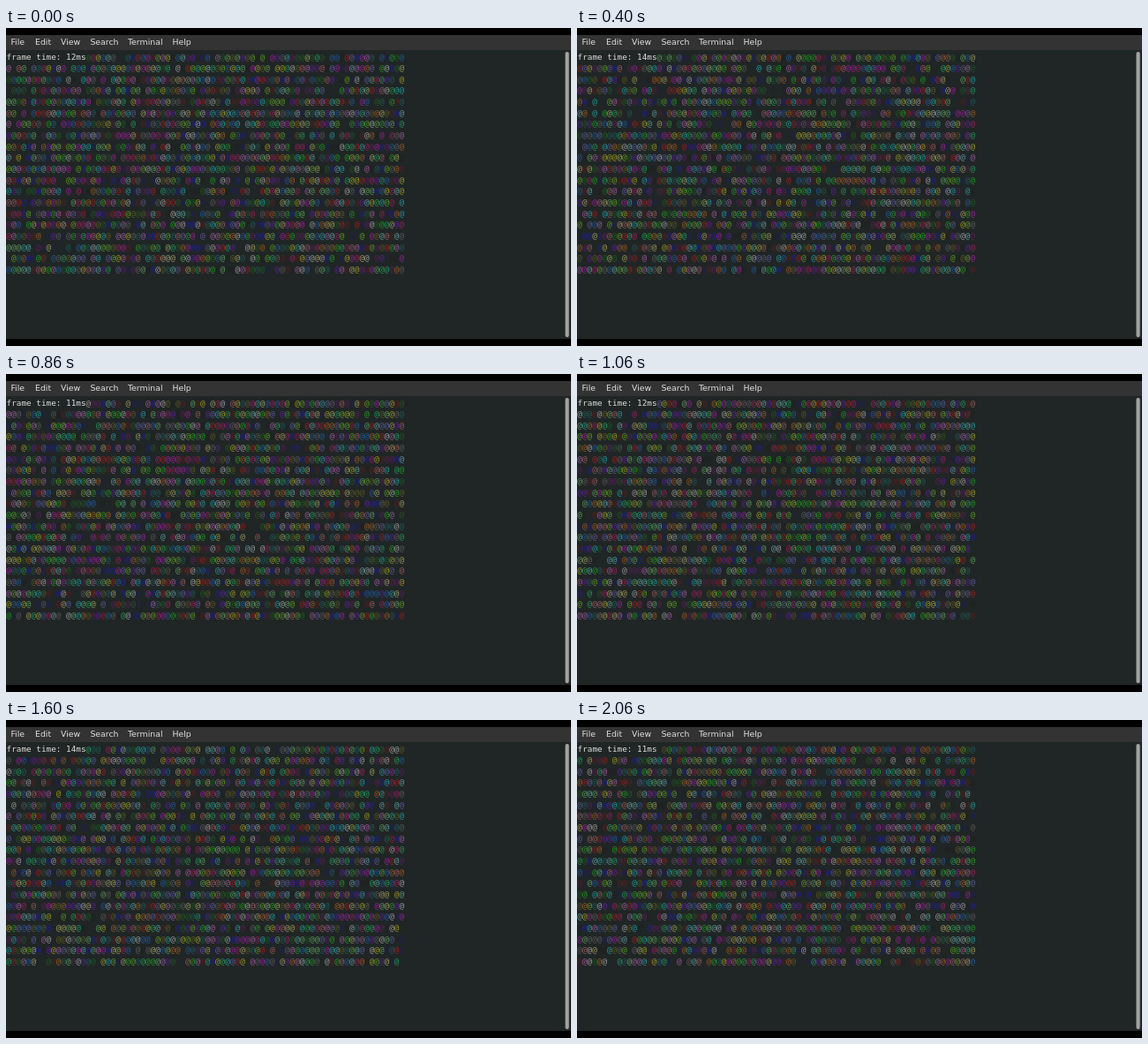
An HTML page with a canvas that plays this animation: 640x360 px, repeating every 2130 ms.

```html
<!DOCTYPE html>
<html lang="en">
<head>
<meta charset="utf-8">
<title>Terminal</title>
<style>
html, body { margin: 0; width: 100%; height: 100%; overflow: hidden; background: #000; }
canvas { display: block; }
</style>
</head>
<body>
<canvas id="stage" width="640" height="360"></canvas>
<script>
const ctx = document.getElementById('stage').getContext('2d');
const LOOP = 2130, STEPS = 32;
const COLS = 80, ROWS = 20, CELL_W = 5.635, ROW_H = 12.66, BASE_Y = 35.5;
const MONO = '9.36px "DejaVu Sans Mono", monospace';
const SANS = '9.36px "DejaVu Sans", sans-serif';
const MENU = [['File', 5.4], ['Edit', 33], ['View', 62], ['Search', 95.4], ['Terminal', 138], ['Help', 188.4]];
const LEVELS = [32, 90, 155];
// Milliseconds reported at each step
const TIMES = [12, 12, 13, 11, 12, 13, 14, 12, 11, 12, 11, 13, 12, 11, 12, 13,
               12, 11, 12, 14, 11, 12, 13, 11, 14, 12, 11, 12, 13, 12, 11, 11];

function random(seed) {
  return () => {
    seed = (seed + 0x6D2B79F5) | 0;
    let v = Math.imul(seed ^ (seed >>> 15), 1 | seed);
    v ^= v + Math.imul(v ^ (v >>> 7), 61 | v);
    return ((v ^ (v >>> 14)) >>> 0) / 4294967296;
  };
}

function rect(color, x, y, w, h) {
  ctx.fillStyle = color;
  ctx.fillRect(x, y, w, h);
}

function text(str, x, y, font, color) {
  ctx.font = font;
  ctx.fillStyle = color;
  ctx.fillText(str, x, y);
}

function drawWindow() {
  rect('#000', 0, 0, 640, 360);
  rect('#333', 0, 8, 640, 17);
  rect('#202525', 0, 25, 640, 327);
  ctx.fillStyle = '#a3a39f';
  ctx.beginPath();
  ctx.roundRect(633.5, 27, 4.2, 323, 2);
  ctx.fill();
  for (const [label, x] of MENU) text(label, x, 19.2, SANS, '#e0e0e0');
}

function drawCells(step) {
  const rnd = random(step * 7919 + 17);
  const level = () => LEVELS[Math.floor(rnd() * 3)];
  const label = `frame time: ${TIMES[step]}ms`;
  text(label, 0.5, BASE_Y, MONO, '#dededa');
  for (let i = label.length; i < COLS * ROWS; i++) {
    if (rnd() < 0.08) continue;
    const color = `rgb(${level()},${level()},${level()})`;
    text('@', i % COLS * CELL_W + 0.3, BASE_Y + Math.floor(i / COLS) * ROW_H, MONO, color);
  }
}

// Steps last a fifteenth of a second, rounded down to 10 ms
const startOf = n => Math.floor(n * 20 / 3) * 10;
let shown = -1;

function tick() {
  const t = performance.now() % LOOP;
  let step = STEPS - 1;
  while (startOf(step) > t) step--;
  if (step !== shown) {
    shown = step;
    drawWindow();
    drawCells(step);
  }
  requestAnimationFrame(tick);
}
tick();
</script>
</body>
</html>
```
